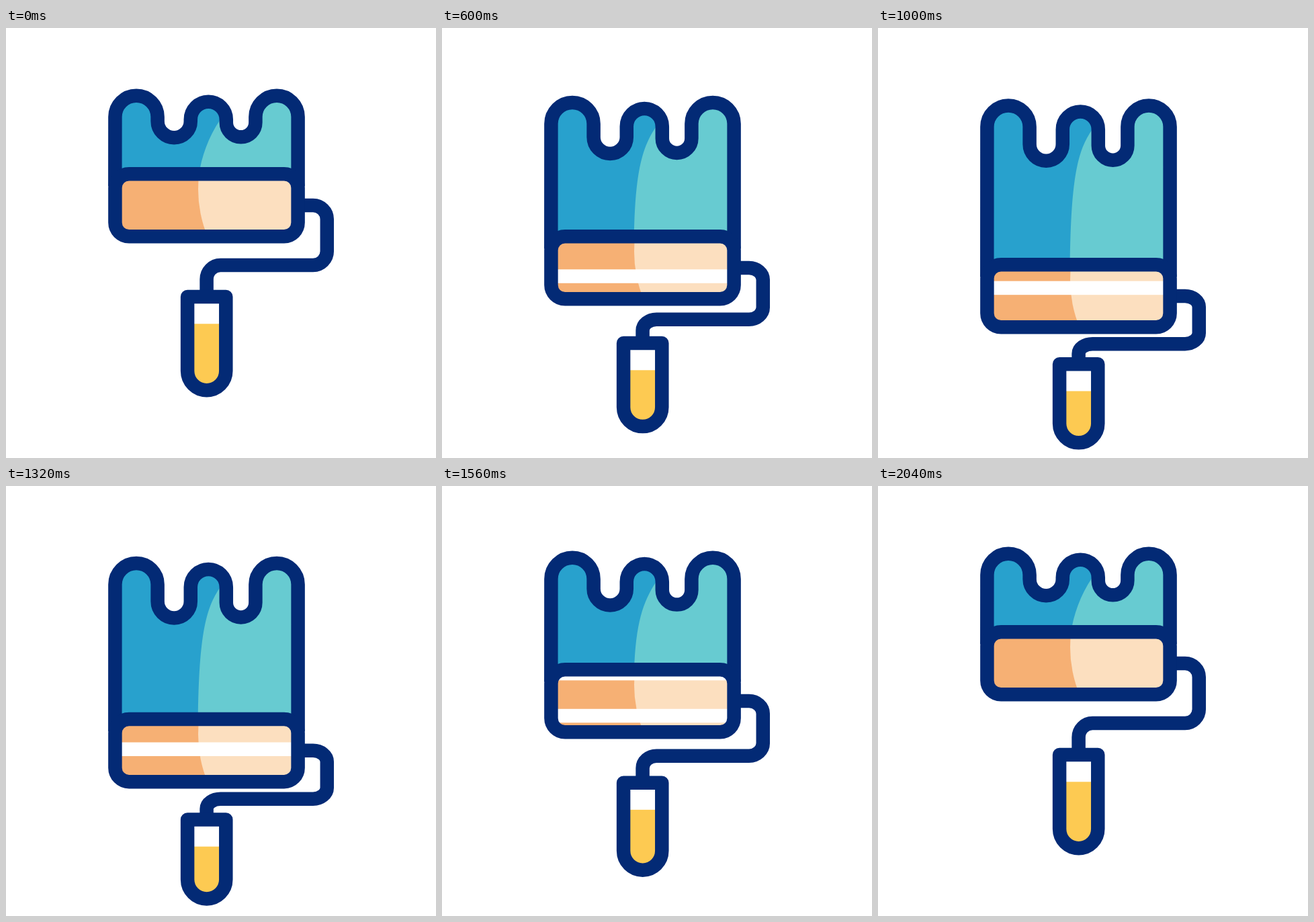
Animation, 640 px wide and 640 px high, one loop 2200 ms. Source, as an HTML page with a canvas:

```html
<!DOCTYPE html>
<html lang="en">
<head>
<meta charset="utf-8">
<title>Paint roller</title>
<style>
  html, body { margin: 0; width: 100%; height: 100%; overflow: hidden; background: #fff; }
  canvas { display: block; width: 640px; height: 640px; }
</style>
</head>
<body>
<canvas id="stage" width="640" height="640"></canvas>
<script>
const ctx = document.getElementById('stage').getContext('2d');

const LOOP = 2200, STEP = 40;
const DOWN_AT = 200, UP_AT = 1200, MOVE = 815, TRAVEL = 135;
const NAVY = '#032a75', BLUE = '#28a1cd', TEAL = '#67cbd1';
const ORANGE = '#f6b074', PEACH = '#fcdfbf', YELLOW = '#fdca52';
const LINE = 20.5;

const clamp = v => Math.min(1, Math.max(0, v));

// Cubic bezier easing (.497, 0, .257, 1), solved by bisection.
function ease(x) {
  if (x <= 0 || x >= 1) return clamp(x);
  let lo = 0, hi = 1;
  for (let i = 0; i < 30; i++) {
    const s = (lo + hi) / 2, r = 1 - s;
    const bx = 3 * r * r * s * 0.497 + 3 * r * s * s * 0.257 + s * s * s;
    if (bx < x) lo = s; else hi = s;
  }
  return lo * lo * (3 - 2 * lo);
}

const travelAt = t =>
  TRAVEL * (ease((t - DOWN_AT) / MOVE) - ease((t - UP_AT) / MOVE));

function stroke(path) {
  ctx.strokeStyle = NAVY;
  ctx.lineWidth = LINE;
  ctx.lineJoin = 'round';
  ctx.stroke(path);
}

function fill(path, color) {
  ctx.fillStyle = color;
  ctx.fill(path);
}

function clipped(path, draw) {
  ctx.save();
  ctx.clip(path);
  draw();
  ctx.restore();
}

function paint(d) {
  const crest = d * 0.1096, valley = d * 0.2548, foot = 235.5 + d;
  const edge = new Path2D();
  edge.moveTo(162.3, foot);
  // x centre, y centre, radius, counterclockwise
  [[194, 132.3 + crest, 31.6, false],
   [250.2, 138.7 + valley, 24.6, true],
   [301.3, 136.3 + crest, 26.5, false],
   [349.6, 140.5 + valley, 21.8, true],
   [403, 132.3 + crest, 31.6, false]
  ].forEach(([x, y, r, ccw]) => edge.arc(x, y, r, Math.PI, 0, ccw));
  edge.lineTo(434.6, foot);

  const light = new Path2D();
  light.moveTo(318, 60);
  light.lineTo(318, 137.5 + crest);
  light.bezierCurveTo(298, 168 + crest, 286, 204 + crest, 285.7, 240 + d);
  light.lineTo(460, 240 + d);
  light.lineTo(460, 60);

  clipped(edge, () => {
    ctx.fillStyle = BLUE;
    ctx.fillRect(150, 80, 300, 140 + d);
    ctx.save();
    ctx.beginPath();
    ctx.rect(150, 80, 300, 140 + d);
    ctx.clip();
    fill(light, TEAL);
    ctx.restore();
  });
  stroke(edge);
}

function roller(d) {
  const box = new Path2D();
  box.roundRect(162.4, 217.2 + d, 272.2, 93.1, 20.7);
  const light = new Path2D();
  light.arc(471, 240 + d, 185, 0, Math.PI * 2);

  clipped(box, () => {
    ctx.fillStyle = ORANGE;
    ctx.fillRect(150, 200 + d, 300, 130);
    fill(light, PEACH);
    ctx.fillStyle = '#fff';
    for (const top of [94.7, 157.7, 220.3, 277.6]) {
      ctx.fillRect(150, 227.3 + d + top - 1.95 * d, 300, 20.5);
    }
  });
  stroke(box);
}

function rod(d) {
  const top = 264 + d, low = 353 + d * 0.868;
  const path = new Path2D();
  path.moveTo(434.6, top);
  path.lineTo(457, top);
  const k = 0.552, r = 20.7, right = 477.8, left = 298.6;
  const upper = 284.7 + d * 0.969, lower = 332.3 + d * 0.899, bend = 374 + d * 0.82;
  path.bezierCurveTo(457 + r * k, top, right, upper - (upper - top) * k, right, upper);
  path.lineTo(right, lower);
  path.bezierCurveTo(right, lower + (low - lower) * k, 457 + r * k, low, 457, low);
  path.lineTo(left + r, low);
  path.bezierCurveTo(left + r * (1 - k), low, left, bend - (bend - low) * k, left, bend);
  path.lineTo(left, 400 + d * 0.742);
  stroke(path);
}

function handle(d) {
  const top = 400.1 + d * 0.742, centre = 510.6 + d * 0.579;
  const grip = new Path2D();
  grip.moveTo(270.1, top);
  grip.lineTo(327.3, top);
  grip.arc(298.7, centre, 28.6, 0, Math.PI);
  grip.closePath();
  fill(grip, '#fff');
  clipped(grip, () => {
    ctx.fillStyle = YELLOW;
    ctx.fillRect(260, top + 40.2, 80, 200);
  });
  stroke(grip);
}

function render(t) {
  const d = travelAt(t);
  ctx.fillStyle = '#fff';
  ctx.fillRect(0, 0, 640, 640);
  paint(d);
  rod(d);
  roller(d);
  handle(d);
}

let start;
function tick(now) {
  start ??= now;
  const t = (now - start) % LOOP;
  render(Math.floor(t / STEP) * STEP);
  requestAnimationFrame(tick);
}
render(0);
requestAnimationFrame(tick);
</script>
</body>
</html>
```
